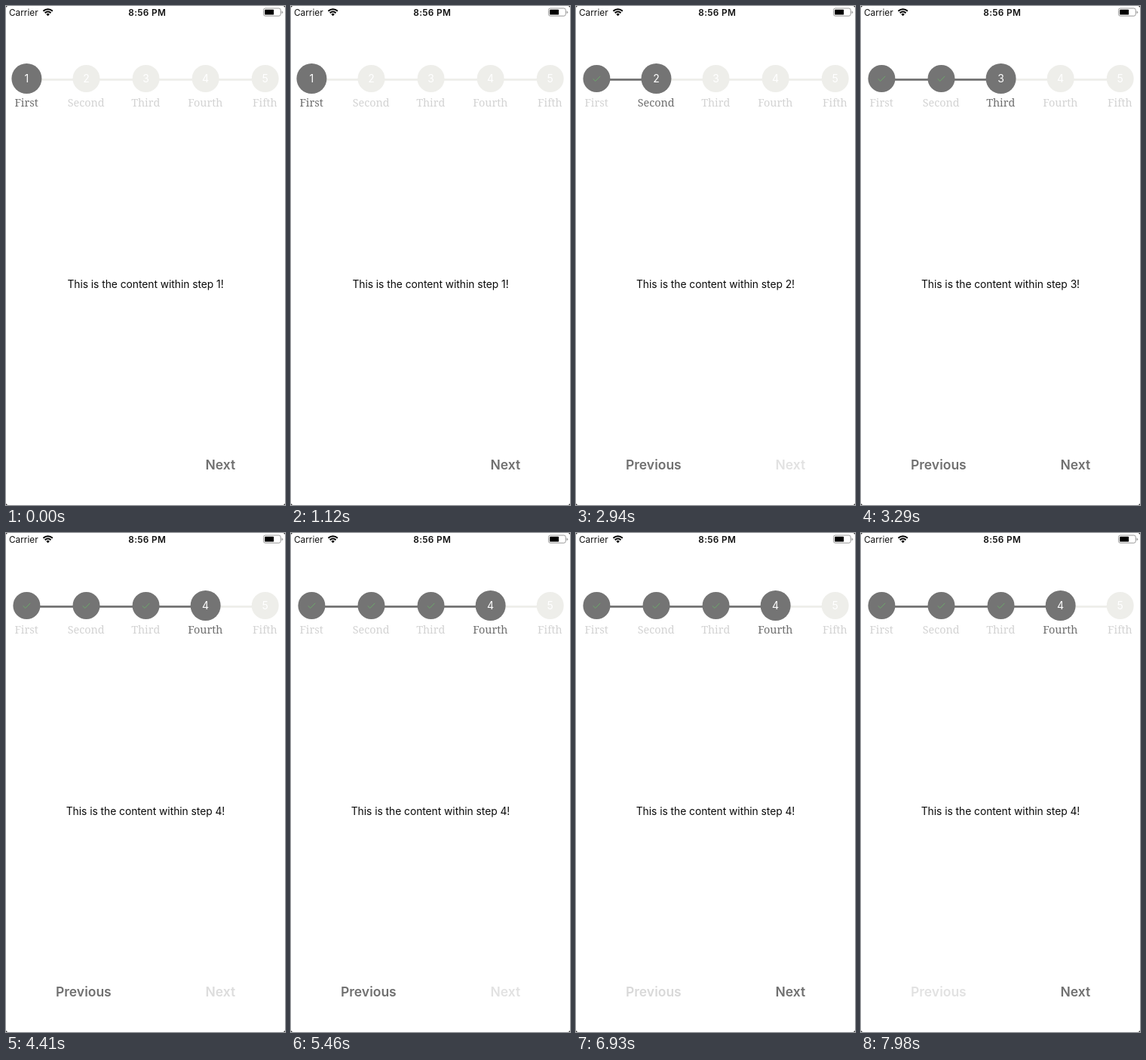
Write an HTML page that moves like this. It is 370 px wide and 660 px high and loops after 8 s.

```html
<!DOCTYPE html>
<html lang="en">
<head>
<meta charset="utf-8">
<title>Progress steps</title>
<style>
  html, body { margin: 0; width: 100%; height: 100%; overflow: hidden; background: #fff; }
  svg { display: block; width: 370px; height: 660px; }
  text { font-family: Inter, Roboto, sans-serif; }
  .status { font-size: 11.8px; fill: #111; }
  .clock { font-weight: 600; letter-spacing: .32px; text-anchor: middle; }
  .content { font-size: 13.8px; letter-spacing: -.03px; text-anchor: middle; fill: #0a0a0a; }
  .num { font-size: 14px; text-anchor: middle; fill: #fff; }
  .label { font-family: "Noto Serif", "Liberation Serif", serif; font-size: 14.4px; text-anchor: middle; fill: #d3d3d3; }
  .label.on { font-weight: 500; fill: #6f6f6f; }
  .dot, .bar { fill: #eeeeea; }
  .dot.on, .bar.on { fill: #747474; }
  .check { fill: none; stroke: #6ca86a; stroke-width: 1; }
  .button { font-size: 17.5px; font-weight: 600; fill: #707070; }
  .end { text-anchor: end; }

  .anim { animation: 8s step-end -4ms infinite; }
  .view { visibility: hidden; }
  .v1 { animation-name: v1; }
  .v2 { animation-name: v2; }
  .v3 { animation-name: v3; }
  .v4 { animation-name: v4; }
  .v5 { animation-name: v5; }
  .not5 { animation-name: not5; }
  .after1 { animation-name: after1; }
  .next { animation-name: next; }
  .prev { animation-name: prev; }

  @keyframes v1 { 0% { visibility: visible } 21.875%, 100% { visibility: hidden } }
  @keyframes v2 { 0%, 38.5%, 100% { visibility: hidden } 21.875% { visibility: visible } }
  @keyframes v3 { 0%, 55.125%, 100% { visibility: hidden } 38.5% { visibility: visible } }
  @keyframes v4 { 0%, 70%, 100% { visibility: hidden } 55.125%, 86.625% { visibility: visible } }
  @keyframes v5 { 0%, 86.625%, 100% { visibility: hidden } 70% { visibility: visible } }
  @keyframes not5 { 0%, 86.625%, 100% { visibility: visible } 70% { visibility: hidden } }
  @keyframes after1 { 0% { visibility: hidden } 21.875%, 100% { visibility: visible } }

  /* each press dims the button at once, release fades it back */
  @keyframes next {
    0%, 24.5%, 41.125%, 58.625%, 72.625%, 100% { opacity: 1 }
    20.125%, 21.875%, 36.75%, 38.5%, 53.375%, 68.25% { opacity: .2 }
    22.75%, 39.375%, 56% { opacity: .4 }
    23.625%, 40.25% { opacity: .8 }
    55.125%, 70% { opacity: .24 }
    56.875% { opacity: .7 }
    57.75% { opacity: .93 }
    70.875% { opacity: .5 }
    71.75% { opacity: .85 }
  }
  @keyframes prev {
    0%, 89.25% { opacity: 1 }
    84%, 99.75%, 100% { opacity: .2 }
    86.625% { opacity: .27 }
    87.5% { opacity: .5 }
    88.375% { opacity: .85 }
  }
</style>
</head>
<body>
<svg viewBox="0 0 370 660">
  <path d="M0 0h2L0 2zM370 0v2L368 0zM0 660v-2L2 660zM370 660h-2l2-2z" fill="#333"/>

  <text class="status" x="4" y="12.5">Carrier</text>
  <text class="status clock" x="187.2" y="12.5">8:56 PM</text>
  <g fill="none" stroke="#000" stroke-width="2">
    <path d="M49.4 6.7a8.8 8.8 0 0 1 12.4 0"/>
    <path d="M51.7 9.2a5.5 5.5 0 0 1 7.8 0"/>
  </g>
  <path d="M55.6 13.2l-2.2-2.3a3.1 3.1 0 0 1 4.4 0z"/>
  <rect x="341.5" y="3" width="22.8" height="10.2" rx="2.4" fill="none" stroke="#999"/>
  <rect x="343.1" y="4.7" width="12" height="6.9" rx=".9"/>
  <path d="M365.6 6.4q1.6 .4 1.6 1.8t-1.6 1.8z" fill="#999"/>

  <g id="views"></g>

  <g class="anim prev">
    <text class="button anim view after1" x="66" y="613">Previous</text>
  </g>
  <g class="anim next">
    <text class="button end anim not5" x="304.2" y="613">Next</text>
    <text class="button end anim view v5" x="304.2" y="613">Submit</text>
  </g>
</svg>
<script>
  const labels = ['First', 'Second', 'Third', 'Fourth', 'Fifth'];
  const centerX = i => 27.4 + i * 79.08;
  const on = flag => flag ? ' on' : '';

  function bar(i, active) {
    return `<rect class="bar${on(i < active)}" x="${centerX(i)}" y="96" width="79" height="2.8"/>`;
  }

  function step(label, i, active) {
    const x = centerX(i);
    const mark = i < active
      ? `<path class="check" d="M${x - 4.8} 96.4l3.2 3l6.4 -6.6"/>`
      : `<text class="num" x="${x}" y="101">${i + 1}</text>`;
    return `<circle class="dot${on(i <= active)}" cx="${x}" cy="96" r="${i === active ? 20 : 18}"/>${mark}
      <text class="label${on(i === active)}" x="${x - .3}" y="133">${label}</text>`;
  }

  function view(_, active) {
    const bars = labels.slice(1).map((_, i) => bar(i, active)).join('');
    const steps = labels.map((label, i) => step(label, i, active)).join('');
    return `<g class="anim view v${active + 1}">${bars}${steps}
      <text class="content" x="185" y="372.5">This is the content within step ${active + 1}!</text></g>`;
  }

  document.getElementById('views').innerHTML = labels.map(view).join('');
</script>
</body>
</html>
```
